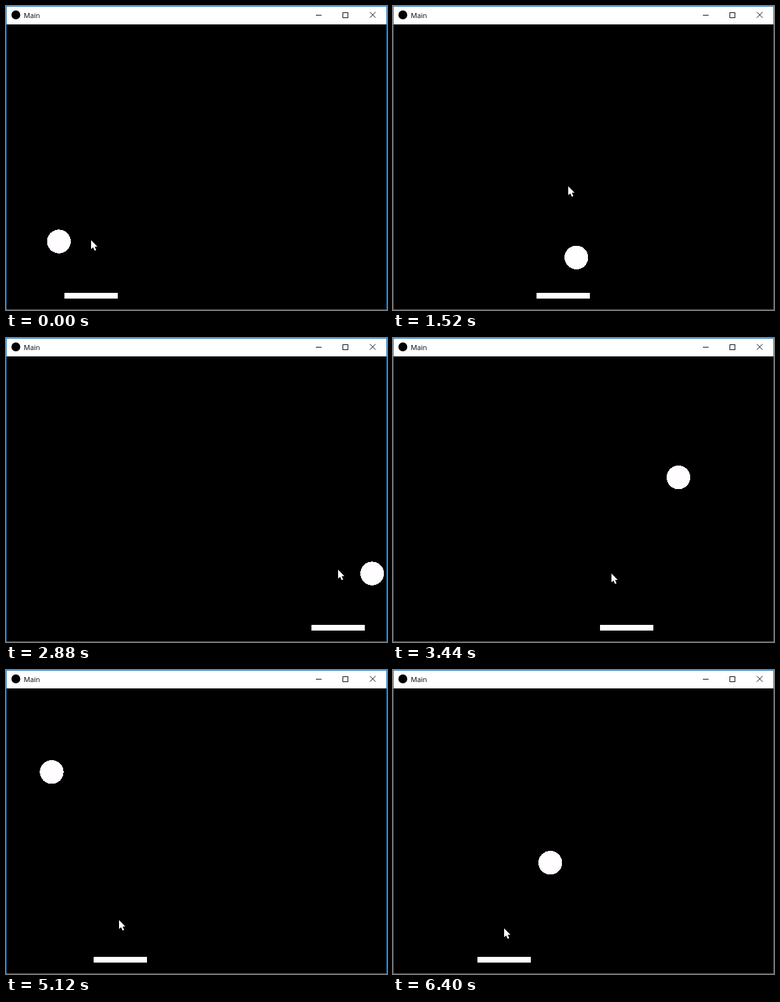
These frames come from a looping animation (600x479 px, 6.44 s). An HTML page:

```html
<!DOCTYPE html>
<html lang="en">
<head>
<meta charset="utf-8">
<title>Main</title>
<style>
  html, body { margin: 0; width: 100%; height: 100%; overflow: hidden; background: #000; }
  svg { display: block; width: 100%; height: 100%; }
  text { font: 11px "Open Sans", "Noto Sans", sans-serif; }
  .crisp { fill: #fffdff; shape-rendering: crispEdges; }
</style>
</head>
<body>
<svg viewBox="0 0 600 479">
  <rect width="600" height="479"/>
  <circle id="ball" class="crisp" r="18.7"/>
  <rect id="paddle" class="crisp" y="452" width="84" height="9"/>
  <path id="cursor" d="M0 0V14L3.2 11.2L5.6 16.4L8 15.4L5.7 10.3H10Z" fill="#fff"/>
  <rect width="600" height="29" fill="#fff"/>
  <circle cx="15.5" cy="14" r="7"/>
  <text x="28" y="19">Main</text>
  <g fill="none" stroke="#000">
    <path d="M488 14.5H497"/>
    <rect x="530.5" y="10.5" width="8" height="8"/>
    <path d="M573 9.5L582 18.5M582 9.5L573 18.5"/>
  </g>
  <rect x=".5" y=".5" width="599" height="478" fill="none" stroke="#1b72b8"/>
</svg>
<script>
const STEP = 40, STEPS = 161;   // one loop, in ms per step
const TICKS = 0.06;             // game ticks per ms
const SCALE = 0.9346;           // game pixels to stage pixels
const LEAD = 45;                // the paddle trails the cursor by this many ms
const get = id => document.getElementById(id);
const ball = get("ball"), paddle = get("paddle"), cursor = get("cursor");

// Each sweep of the hand: start, duration, distance across, distance down
const sweeps = [
  [80, 640, 169.5, -31],
  [776, 430, -46, -60],
  [1384, 1115, 265.5, 87],
  [3000, 990, -370.5, 13],
  [4100, 600, 41, 8],
  [4875, 385, -18.5, 10],
  [5300, 300, 0, 11]
];

function ease(u) {
  u = Math.min(1, Math.max(0, u));
  return u * u * (3 - 2 * u);
}

function hand(t) {
  let x = 91.5, y = 369;
  for (const [start, time, dx, dy] of sweeps) {
    const done = ease((t - start) / time);
    x += dx * done;
    y += dy * done;
  }
  return { x, y };
}

// Ticks away from the nearest bounce off the near wall
function bounce(tick, period) {
  const d = (tick + period) % period;
  return Math.min(d, period - d);
}

function draw(now) {
  const t = Math.floor(now / STEP) % STEPS * STEP;
  const tick = Math.floor(t * TICKS + 1e-6);
  const x = 16 + 4 * bounce(tick - 18, 304);
  const y = 15 + 9 * bounce(tick - 39, 94);
  ball.setAttribute("cx", (x + 1) * SCALE);
  ball.setAttribute("cy", (y + 31) * SCALE);
  paddle.setAttribute("x", hand(t).x);
  const tip = hand(t + LEAD);
  cursor.setAttribute("transform", `translate(${Math.round(tip.x + 42.7)} ${Math.round(tip.y)})`);
}

const start = performance.now();
function loop() {
  draw(performance.now() - start);
  requestAnimationFrame(loop);
}
loop();
</script>
</body>
</html>
```
